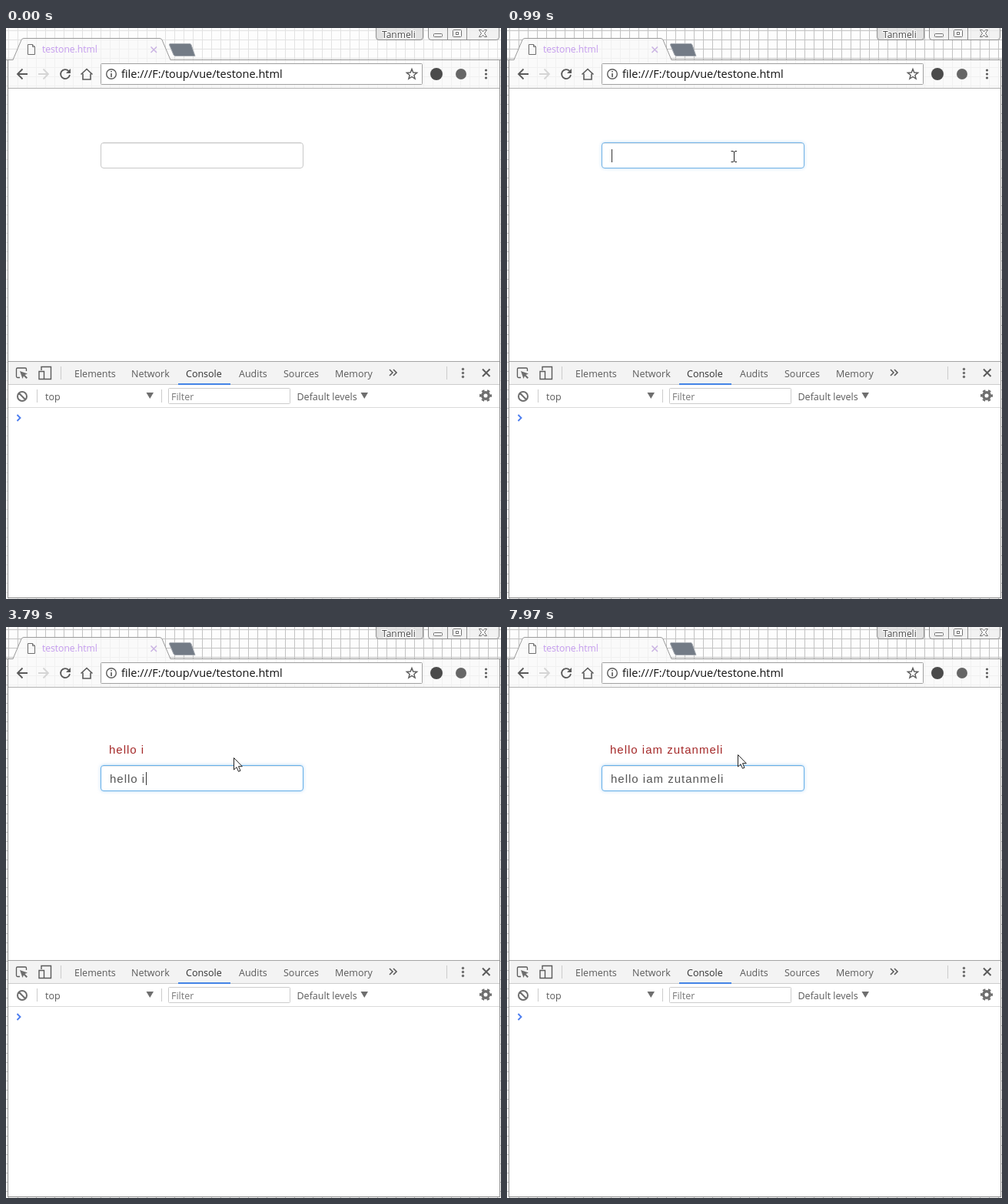
Write an HTML page that moves like this. It is 644x744 px and loops after 8000 ms.

```html
<!DOCTYPE html>
<html lang="en">
<head>
<meta charset="utf-8">
<style>
html, body { margin: 0; width: 100%; height: 100%; overflow: hidden; background: #fff; }
svg { display: block; font: 12.5px "Open Sans", "Noto Sans", sans-serif; }
text { white-space: pre; fill: #555; }
.typed { font: 15px "Liberation Sans", Arial, sans-serif; letter-spacing: 1px; }
.icon { fill: none; stroke: #5a5a5a; stroke-width: 1.8; }
.thin { fill: none; stroke: #6e6e6e; stroke-width: 1; }
.solid { fill: #6e6e6e; }
.rule { fill: none; stroke: #ccc; }
</style>
</head>
<body>
<svg width="644" height="744" viewBox="0 0 644 744">
  <defs>
    <pattern id="grid" width="12" height="12" patternUnits="userSpaceOnUse">
      <path id="gridLine" d="M3.5 0V12M0 3.5H12" fill="none"/>
    </pattern>
    <pattern id="faint" width="12" height="12" patternUnits="userSpaceOnUse">
      <path d="M3.5 0V12M0 3.5H12" fill="none" stroke="#f1f1f1"/>
    </pattern>
  </defs>

  <!-- window frame and tab strip -->
  <rect width="644" height="744" fill="#fdfdfd"/>
  <rect width="644" height="744" fill="url(#grid)"/>
  <rect x="2.5" y="41.5" width="640" height="701" fill="#fff" stroke="#8c8c8c"/>
  <g id="toolbar">
    <path d="M3 42H9L20 16Q21 14 23 14H200Q202 14 203 16L214 42H642V78H3Z" fill="#fafafa"/>
    <path d="M3 42H9L20 16Q21 14 23 14H200Q202 14 203 16L214 42H642V78H3Z" fill="url(#faint)"/>
    <path d="M0 41.5H9L20 15.5Q21 13.5 23 13.5H200Q202 13.5 203 15.5L214 41.5H644" fill="none" stroke="#999"/>
    <path d="M3 78.5H642" stroke="#b2b2b2"/>
  </g>
  <path class="thin" d="M28.5 21.5H34.5L37.5 24.5V34.5H28.5ZM34.5 21.5V24.5H37.5"/>
  <text x="47" y="32" style="font-size:12.1px;fill:#c49bee">testone.html</text>
  <path d="M188.5 24.5L196 32M196 24.5L188.5 32" stroke="#c9b2e2" stroke-width="1.5"/>
  <path d="M214 20.5H239Q240.500 20.5 241 22L246 36.5H221Q219 36.5 218 35L212.5 22Q212 20.5 214 20.5Z" fill="#737b86" stroke="#a4a9b0"/>

  <!-- window buttons -->
  <g fill="#f0f0f0" fill-opacity=".8" stroke="#8f8f8f">
    <path d="M481.5 0V12Q481.5 15.5 485 15.5H539Q542.5 15.5 542.5 12V0" fill="#dedede"/>
    <path d="M549.5 0V12Q549.5 15.5 553 15.5H638Q641.5 15.5 641.5 12V0M574.5 0V15.5M599.5 0V15.5"/>
  </g>
  <text x="489" y="13" style="font-size:12px;fill:#444;stroke:#fff;stroke-width:2px;paint-order:stroke">Tanmeli</text>
  <g fill="#fff" stroke="#707070">
    <rect x="556.5" y="7.5" width="11" height="4" rx="1"/>
    <rect x="581.5" y="2.5" width="11" height="9" rx="1"/>
    <rect x="585.5" y="5.5" width="3" height="3"/>
    <path d="M615.5 2.5H618.5L620.5 5L622.5 2.5H625.5L622.5 7L625.5 11.5H622.5L620.5 9L618.5 11.5H615.5L618.5 7Z"/>
  </g>

  <!-- address bar -->
  <g class="icon">
    <path d="M28 60H15.5M21.5 53.5L15 60L21.5 66.5"/>
    <path d="M42 60H54.5M48.5 53.5L55 60L48.5 66.5" stroke="#d5d5d5"/>
    <path d="M81.5 56A6 6 0 1 0 83 61"/>
    <path d="M97.5 60.5L105 53.5L112.5 60.5M100 59.5V67H110V59.5" stroke-width="1.6"/>
  </g>
  <path d="M84 53V59H78Z" fill="#5a5a5a"/>
  <rect x="123.5" y="46.5" width="418" height="27" rx="1" fill="#fff" stroke="#a0a0a0"/>
  <circle class="icon" cx="137" cy="60" r="6.3" style="stroke-width:1.4"/>
  <path d="M137 56V57.6M137 59V64" stroke="#555" stroke-width="1.6"/>
  <text x="150" y="65" style="font-size:14.5px;fill:#111">file:///F:/toup/vue/testone.html</text>
  <path id="star" class="icon" style="stroke-width:1.4"/>
  <circle cx="560" cy="60" r="8" fill="#4a4a4a"/>
  <circle cx="592" cy="60" r="7" fill="#666"/>
  <g fill="#5a5a5a"><circle cx="624.5" cy="55" r="1.6"/><circle cx="624.5" cy="60" r="1.6"/><circle cx="624.5" cy="65" r="1.6"/></g>

  <!-- developer panel -->
  <rect x="3" y="435" width="639" height="29" fill="#f3f3f3"/>
  <path d="M3 434.5H642" stroke="#a3a3a3"/>
  <path class="rule" d="M3 464.5H642M71.5 441V458M573.5 441V458M40.5 471V488M202.5 471V488"/>
  <path d="M3 494.5H642" stroke="#dadada"/>
  <rect x="224" y="463" width="68" height="2" fill="#4484e6"/>
  <path class="icon" style="stroke-width:1.3" d="M18 455.5H15Q13.5 455.5 13.5 454V444.5Q13.5 443 15 443H25Q26.5 443 26.5 444.5V447"/>
  <path class="solid" d="M18 447L28 450.5L24.5 452L28 455.5L26.5 457L23 453.5L21.5 457Z"/>
  <path class="icon" style="stroke-width:1.4" d="M46 446V441.5H58.5V457.5H50M43 447.5H49.5V457.5H43Z"/>
  <path class="icon" style="stroke-width:1.6" d="M499 445L503 449L499 453M504 445L508 449L504 453"/>
  <g class="solid"><circle cx="594.5" cy="444.5" r="1.7"/><circle cx="594.5" cy="449.5" r="1.7"/><circle cx="594.5" cy="454.5" r="1.7"/></g>
  <path class="icon" d="M620 444.5L629.5 454M629.5 444.5L620 454" style="stroke-width:2"/>
  <path class="icon" style="stroke-width:2;stroke:#6e6e6e" d="M27 480A6 6 0 1 1 15 480A6 6 0 1 1 27 480M16.8 475.8L25.2 484.2"/>
  <path class="solid" d="M182.5 475H192L187.25 483ZM461.5 475H471L466.25 483Z"/>
  <rect x="211.5" y="469.5" width="158" height="20" rx="1" fill="#fff" stroke="#ccc"/>
  <g id="labels"></g>
  <g fill="none" stroke="#6e6e6e">
    <circle cx="624" cy="479" r="4.3" stroke-width="3.5"/>
    <circle cx="624" cy="479" r="6.8" stroke-width="2.4" stroke-dasharray="3.56" stroke-dashoffset="1.78"/>
  </g>
  <path d="M14.5 504L18.5 508L14.5 512" fill="none" stroke="#4b7df0" stroke-width="1.9"/>

  <!-- page -->
  <text id="echo" class="typed" x="134" y="165" style="fill:#a52a2a"></text>
  <g id="field">
    <rect id="box" x="123.5" y="149.5" width="263" height="33" rx="3.5" fill="#fff"/>
    <path d="M126 150.5H384" stroke="#000" stroke-opacity=".075"/>
    <text id="value" class="typed" x="135" y="172"></text>
    <rect id="caret" y="158" width="1" height="17" fill="#333"/>
  </g>
  <path id="arrow" d="M.5 .5V16L4 12.7L6.5 18.3L9 17.2L6.5 11.7H11.3Z" fill="#fff" stroke="#222"/>
  <path id="beam" d="M-3.5 -6.5H-1L.5 -5.5L2 -6.5H4M.5 -5.5V6.5M-3.5 7.5H-1L.5 6.5L2 7.5H4" fill="none" stroke="#222"/>
</svg>
<script>
const LOOP = 8000, FOCUS = 910;
const $ = id => document.getElementById(id);
const message = "hello iam zutanmeli";
const keyTimes = [2320, 2390, 2460, 2620, 2760, 3160, 3710, 4320, 4410, 4720,
  5500, 5650, 5720, 5880, 5960, 6100, 6100, 6180, 6340];
const caretHidden = [[0, FOCUS], [1460, 2000], [5260, 5500], [6880, 7340], [7900, LOOP]];
// time, x, y, shape
const pointerSteps = [
  [70, 563, 712, "arrow"], [140, 505, 545, "arrow"], [210, 425, 380, "arrow"],
  [280, 355, 245, "arrow"], [350, 313, 175, "arrow"], [420, 298, 150, "arrow"],
  [520, 290, 137, "arrow"], [590, 286, 136, "arrow"], [660, 292, 158, "beam"],
  [750, 294, 164, "beam"], [830, 295, 167, "beam"],
  [2320, 296, 170, "arrow"], [7970, 300, 166, "arrow"]
];

const labels = [["Elements", 89], ["Network", 163], ["Console", 234], ["Audits", 303], ["Sources", 361],
  ["Memory", 428], ["top", 51, 485], ["Filter", 215, 485], ["Default levels", 378.5, 485]];
const labelColor = { Console: "#333", Filter: "#777" };
$("labels").innerHTML = labels.map(([name, x, y = 455]) =>
  `<text x="${x}" y="${y}" style="fill:${labelColor[name] || "#5a5a5a"}">${name}</text>`).join("");

const starPoints = Array.from({ length: 10 }, (_, i) => {
  const a = i * Math.PI / 5 - Math.PI / 2, r = i % 2 ? 3 : 7;
  return `${528 + r * Math.cos(a)} ${60.5 + r * Math.sin(a)}`;
});
$("star").setAttribute("d", `M${starPoints.join("L")}Z`);

const show = (id, on) => $(id).style.display = on ? "" : "none";
const mix = (a, b, k) => a.map((v, i) => Math.round(v + (b[i] - v) * k));

function draw(t) {
  const typed = message.slice(0, keyTimes.filter(k => k <= t).length);
  $("echo").textContent = $("value").textContent = typed;
  $("field").setAttribute("transform", `translate(0 ${typed ? 31 : 0})`);

  const width = typed ? $("value").getComputedTextLength() : 0;
  $("caret").setAttribute("x", Math.round(135.6 + width));
  show("caret", !caretHidden.some(([from, to]) => t >= from && t < to));

  const focused = t >= FOCUS;
  const glow = focused ? Math.min(1, (t - FOCUS + 50) / 150) : 0;
  $("gridLine").setAttribute("stroke", focused ? "#c2c2c2" : "#e2e2e2");
  $("box").setAttribute("stroke", `rgb(${mix([200, 200, 200], [102, 175, 233], glow)})`);
  $("box").style.filter = glow ? `drop-shadow(0 0 2px rgba(102,175,233,${0.5 * glow}))` : "none";

  const step = pointerSteps.filter(s => s[0] <= t).pop();
  for (const id of ["arrow", "beam"]) {
    const on = step && step[3] === id;
    show(id, on);
    if (on) $(id).setAttribute("transform", `translate(${step[1]} ${step[2]})`);
  }
}

const start = performance.now();
function tick() {
  draw((performance.now() - start) % LOOP);
  requestAnimationFrame(tick);
}
tick();
</script>
</body>
</html>
```
